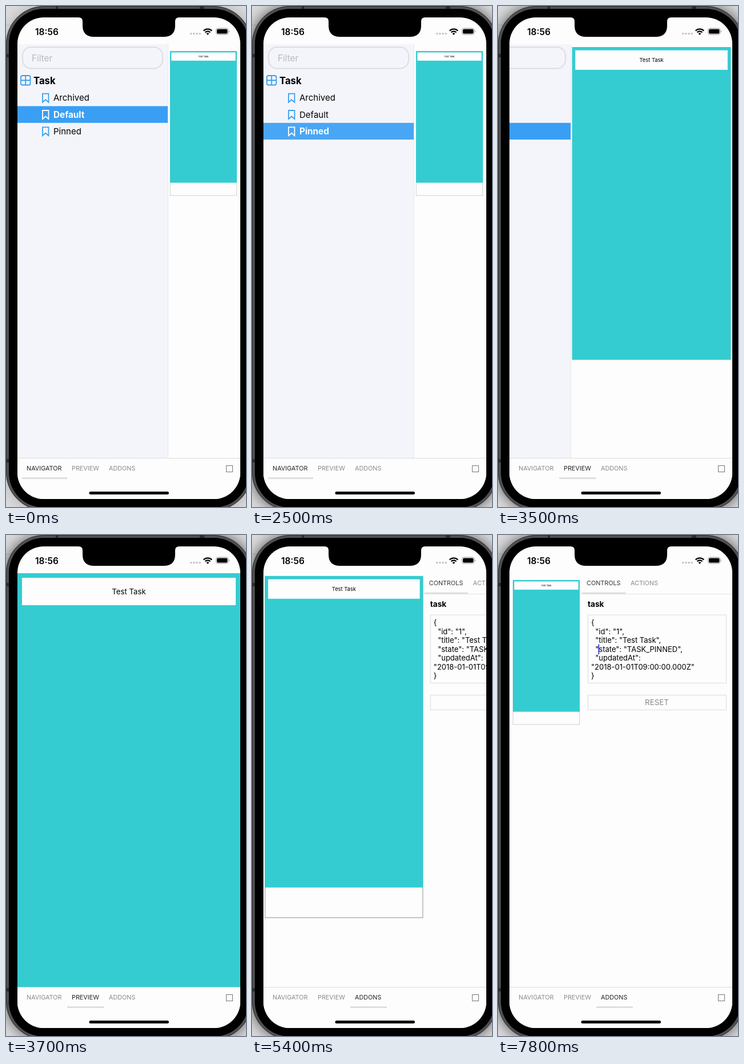
An HTML page for the animation above (8 s loop, 420x878 px).

```html
<!DOCTYPE html>
<html lang="en">
<head>
<meta charset="utf-8">
<title>Phone story browser</title>
<style>
  html, body { margin: 0; width: 100%; height: 100%; overflow: hidden; }
  svg { display: block; width: 420px; height: 878px; font-family: Inter, sans-serif; }
  text { white-space: pre; }
  .tab { font-size: 10.8px; fill: #8a8a8a; }
  .box { fill: none; stroke: #dcdcdc; }
  .icon { fill: none; stroke: #389fee; stroke-width: 1.8; }
  .item { font-size: 15px; }
  .selected .item { font-size: 15.3px; font-weight: 700; fill: #fff; }
  .selected .icon { stroke: #fff; }
  .fill { fill: none; }
  .selected .fill { fill: #399ff5; }
</style>
</head>
<body>
<svg viewBox="0 0 420 878">
  <defs>
    <clipPath id="screen"><rect x="20" y="20" width="390" height="844" rx="46"/></clipPath>
    <filter id="blur" x="-20%" y="-20%" width="140%" height="140%"><feGaussianBlur stdDeviation="12"/></filter>
  </defs>

  <rect width="420" height="878" fill="#dcdcde"/>
  <path d="M0 33.500H20" stroke="#c4c4c6"/>
  <rect id="shadow" width="430" height="884" rx="66" filter="url(#blur)"/>
  <rect x=".5" y=".5" width="429" height="883" rx="66" fill="#505052" stroke="#29292b"/>
  <path d="M87 0h4v6h-4zM339 0h8v6h-8zM0 84h6v6h-6zM0 794h6v6h-6z" fill="#2b2b2d"/>
  <rect x="5" y="5" width="420" height="874" rx="61"/>

  <g clip-path="url(#screen)">
    <rect x="20" y="20" width="390" height="844" fill="#fdfdfd"/>

    <g id="navigator">
      <rect x="20" y="67" width="263.500" height="725" fill="#f4f5fb"/>
      <path d="M283.500 67V792" stroke="#e8e8ec"/>
      <rect x="29" y="72" width="245" height="37.500" rx="15" fill="none" stroke="#dddde1" stroke-width="2"/>
      <text x="45" y="96.500" font-size="15.300" fill="#b8b8bc">Filter</text>
      <g class="icon"><rect x="26" y="122" width="16.500" height="16.500" rx="3"/><path d="M34.250 122v16.500M26 130.250h16.500"/></g>
      <text x="48" y="136.500" font-size="16.700" font-weight="700">Task</text>
      <g id="rows"></g>
    </g>

    <g id="preview">
      <rect id="frame" x=".5" y=".5" width="389" height="843" fill="#fdfdfd" stroke="#999" stroke-width="1.500"/>
      <rect width="390" height="769" fill="#34ccd1"/>
      <rect x="8" y="8" width="374" height="48" fill="#fdfdfd"/>
      <text x="195" y="36.500" font-size="13.200" text-anchor="middle">Test Task</text>
    </g>

    <g id="addons">
      <text class="tab" x="155" y="88" style="fill:#333">CONTROLS</text>
      <text class="tab" x="232" y="88">ACTIONS</text>
      <path d="M146.500 103.500H412" stroke="#e4e4e4"/>
      <rect x="146.500" y="100.500" width="77" height="3" fill="#dfdfdf"/>
      <text x="157" y="126" font-size="13.600" font-weight="700">task</text>
      <rect class="box" x="157.500" y="140" width="242" height="119.500"/>
      <g id="json" font-size="13"></g>
      <rect id="caret" x="175.300" y="191.500" width="2" height="17.500" fill="#4250d6"/>
      <rect class="box" x="157.500" y="280.500" width="242" height="26"/>
      <text x="278" y="298.300" font-size="13.400" fill="#8a8a8a" text-anchor="middle">RESET</text>
    </g>

    <rect x="20" y="792" width="390" height="72" fill="#fdfdfd"/>
    <path d="M20 792.500H410" stroke="#dcdcde"/>
    <g id="tabs"></g>
    <rect id="underline" y="826" height="3" fill="#dfdfdf"/>
    <rect x="385.500" y="805.500" width="11" height="11" fill="none" stroke="#777"/>
    <rect x="145.500" y="851" width="139.500" height="5" rx="2.500"/>

    <path d="M127 19v1q7 0 7 7v7q0 20 20 20H276q20 0 20-20v-7q0-7 7-7v-1z"/>
    <text x="51" y="50.500" font-size="15.500" font-weight="600">18:56</text>
    <path d="M323.700 48.500h16" stroke="#c2c2c4" stroke-width="3.600" stroke-linecap="round" stroke-dasharray="0 5.200"/>
    <g fill="none" stroke="#000" stroke-width="2.300">
      <path d="M345.700 43.400a10.300 10.300 0 0 1 14.600 0M348.500 46.200a6.300 6.300 0 0 1 9 0"/>
      <path d="M353 50.800l-2.400-2.400a3.400 3.400 0 0 1 4.800 0z" fill="#000" stroke="none"/>
    </g>
    <rect x="367.500" y="39" width="21.500" height="11" rx="3.300" fill="none" stroke="#999"/>
    <rect x="369" y="40.500" width="18.500" height="8" rx="2"/>
    <path d="M390.300 42.700q2.400 1.800 0 3.600z" fill="#999"/>
  </g>
</svg>
<script>
const $ = id => document.getElementById(id);
const LOOP = 8000, TICK = 100, SLIDE = 350, PANEL = 264.5;

const presses = [
  { row: 0, down: 700, select: 800, settle: 200 },
  { row: 1, down: 1600, select: 1800, settle: 200 },
  { row: 2, down: 2400, select: 2500, settle: 300 },
];
const tabs = [
  { name: 'NAVIGATOR', x: 28, width: 79, down: -1, select: -1000 },
  { name: 'PREVIEW', x: 107, width: 65, down: 3200, select: 3400 },
  { name: 'ADDONS', x: 172, width: 64, down: 5100, select: 5300 },
];
const json = ['{', '  "id": "1",', '  "title": "Test Task",', '  "state": "TASK_PINNED",',
  '  "updatedAt":', '"2018-01-01T09:00:00.000Z"', '}'];

$('rows').innerHTML = ['Archived', 'Default', 'Pinned'].map((name, i) =>
  `<g transform="translate(20 ${146.2 + i * 29.3})">
    <rect class="fill" width="263" height="29.300"/>
    <path class="icon" d="M44 7.500h10.500v15l-5.250-4.500-5.250 4.500z"/>
    <text class="item" x="63" y="20">${name}</text>
  </g>`).join('');
$('tabs').innerHTML = tabs.map(tab =>
  `<text class="tab" x="${tab.x + 8}" y="813.500">${tab.name}</text>`).join('');
$('json').innerHTML = json.map((line, i) =>
  `<text x="163" y="${158 + i * 15.5}">${line}</text>`).join('');

const rowNodes = [...$('rows').children], tabNodes = [...$('tabs').children];
const clamp = v => Math.min(1, Math.max(0, v));
const slide = (t, start) => {
  const u = clamp((t - start) / SLIDE);
  return u * u * (3 - 2 * u);
};
const move = (id, x) => $(id).setAttribute('transform', `translate(${x} 0)`);

function drawRows(t) {
  const last = presses.filter(p => t >= p.select).pop();
  const selected = last ? last.row : 1;
  rowNodes.forEach((node, i) => {
    const pressed = presses.some(p => p.row === i && t >= p.down && t < p.select);
    const settling = last && i === selected ? 0.91 + 0.09 * clamp((t - last.select) / last.settle) : 1;
    node.setAttribute('class', i === selected ? 'selected' : '');
    node.setAttribute('opacity', pressed ? 0.2 : settling);
  });
}

function drawTabs(t) {
  const active = tabs.filter(tab => t >= tab.select).pop();
  tabs.forEach((tab, i) => {
    const pressed = t >= tab.down && t < tab.select;
    const settling = tab === active ? 0.85 + 0.15 * clamp((t - tab.select) / 100) : 1;
    tabNodes[i].style.fill = tab === active ? '#222' : '';
    tabNodes[i].setAttribute('opacity', pressed ? 0.2 : settling);
  });
  $('underline').setAttribute('x', active.x);
  $('underline').setAttribute('width', active.width);
  $('frame').setAttribute('visibility', active.name === 'PREVIEW' ? 'hidden' : 'visible');
}

function drawPanels(t) {
  const toPreview = slide(t, 3304), toAddons = slide(t, 5245);
  const shrink = 1 - toPreview + toAddons;
  const x = 20 + 267 * (1 - toPreview) + 6 * toAddons;
  $('preview').setAttribute('transform', `translate(${x} ${67 + 12 * shrink}) scale(${1 - 0.7 * shrink})`);
  move('navigator', -PANEL * toPreview);
  move('addons', PANEL * (1 - toAddons));
  $('addons').setAttribute('visibility', toAddons > 0 ? 'visible' : 'hidden');
}

function draw(t) {
  $('shadow').setAttribute('opacity', t < 700 ? 0.2 : 0.6);
  drawRows(t);
  drawTabs(t);
  drawPanels(t);
  const blink = clamp((7400 - t) / 200) + clamp((t - 7600) / 200);
  $('caret').setAttribute('opacity', t < 6800 ? 0 : blink);
}

function tick() {
  const t = performance.now() % LOOP;
  draw(Math.floor(t / TICK) * TICK);
  requestAnimationFrame(tick);
}
tick();
</script>
</body>
</html>
```
